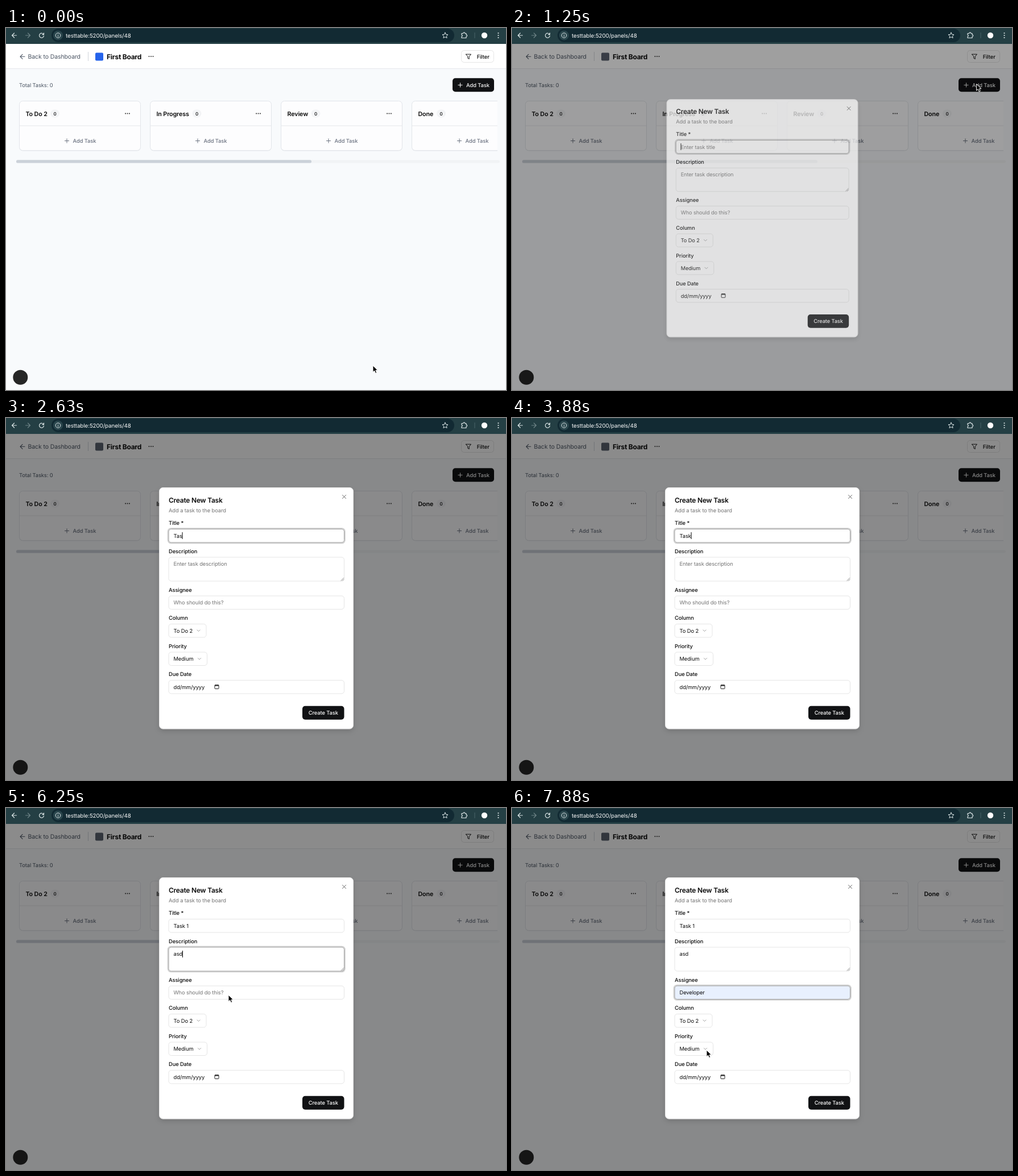
Animation of 879 by 637 pixels, one loop 8000 ms. Source, as an HTML page:

```html
<!DOCTYPE html>
<html lang="en">
<head>
<meta charset="utf-8">
<title>Task board</title>
<style>
  html, body { margin: 0; width: 100%; height: 100%; overflow: hidden; background: #f8fafc; }
  svg { display: block; width: 100%; height: 100%; }
  text {
    font: 400 9.35px Inter, sans-serif; fill: #0a0a0a; white-space: pre;
    letter-spacing: -.01em; text-rendering: geometricPrecision;
  }
  .medium { font-weight: 500; }
  .semi { font-weight: 600; }
  .bold { font-weight: 700; }
  .muted { fill: #6b7280; }
  .slate { fill: #4b5563; }
  .hint { fill: #737373; }
  .light { fill: #fafafa; }
  .mid { text-anchor: middle; }
  .heading { letter-spacing: -.02em; }
  .icon { fill: none; stroke-linecap: round; stroke-linejoin: round; }
  .field { fill: #fff; stroke: #e5e5e5; }
  .focused { stroke: #a1a1a1; }
</style>
</head>
<body>
<svg id="stage" viewBox="0 0 879 637" preserveAspectRatio="none"></svg>
<script>
const LOOP = 8000, STEP = 125;
const stage = document.getElementById('stage');

const text = (x, y, s, cls = '', size = 9.35, extra = '') =>
  `<text x="${x}" y="${y}" class="${cls}" style="font-size:${size}px" ${extra}>${s}</text>`;
const rect = (x, y, w, h, r, fill, extra = '') =>
  `<rect x="${x}" y="${y}" width="${w}" height="${h}" rx="${r}" fill="${fill}" ${extra}/>`;
const icon = (x, y, d, color, width = 1) =>
  `<path class="icon" transform="translate(${x} ${y})" d="${d}" stroke="${color}" stroke-width="${width}"/>`;
const dots = (x, y, dx, dy, color, r) => [-1, 0, 1].map(i =>
  `<circle cx="${x + i * dx}" cy="${y + i * dy}" r="${r}" fill="${color}"/>`).join('');

const PLUS = 'M-3.6 0H3.6M0-3.6V3.6';
const LEFT = 'M4 0H-4M0-4L-4 0L0 4';
const RIGHT = 'M-4 0H4M0-4L4 0L0 4';
const DOWN = 'M-2.6-1.3L0 1.3L2.6-1.3';
const CROSS = 'M-3-3L3 3M3-3L-3 3';
const FUNNEL = 'M-4.5-4H4.5L1.2 0V4.3L-1.2 3V0Z';
const RELOAD = 'M3.6-1.6A4 4 0 1 0 4 .8M4-4.2V-1.4H1.2';
const STAR = 'M0-5L1.5-1.7L5-1.3L2.4 1.1L3.1 4.6L0 2.8L-3.1 4.6L-2.4 1.1L-5-1.3L-1.5-1.7Z';
const PUZZLE = 'M-4.5-3H-1.8A1.6 1.6 0 0 1 1.4-3H3.5V-.6A1.6 1.6 0 0 1 3.5 2.6V5H-4.5V2.5A1.6 1.6 0 0 0-4.5-.6Z';
const BEAM = 'M-3-6.5Q0-6.5 0-4.5Q0-6.5 3-6.5M0-4.5V4.5M-3 6.5Q0 6.5 0 4.5Q0 6.5 3 6.5M-1.5 1.5H1.5';

function toolbar() {
  const ink = '#dbe5e6';
  return rect(0, 0, 879, 28, 0, '#243f44')
    + rect(80, 1, 708, 24, 12, '#122a33')
    + icon(14.5, 13, LEFT, ink, 1.2)
    + icon(38.5, 13, RIGHT, '#6d8386', 1.2)
    + icon(62.5, 13, RELOAD, ink, 1.2)
    + '<circle cx="91.5" cy="13" r="8.5" fill="#2a464d"/>'
    + `<circle cx="91.5" cy="13" r="4.3" fill="none" stroke="${ink}"/>`
    + icon(91.5, 13, 'M0-2V-1.9M0 0V2', ink)
    + text(105, 16.5, 'testtable:5200/panels/48', 'light', 9.8)
    + icon(772, 13, STAR, ink)
    + icon(805.5, 12.5, PUZZLE, ink, 1.2)
    + rect(823.5, 8, 1, 10, 0, '#4b666a')
    + '<circle cx="841" cy="13" r="5.2" fill="#fff"/>'
    + dots(865.5, 13, 0, 4, ink, 1.1);
}

function column([name, badgeX], i) {
  const x = 23 + 230 * i;
  return rect(x + .5, 129.5, 213, 87, 6, '#e9ecef')
    + rect(x + .5, 128.5, 213, 87, 6, '#fdfdfe', 'stroke="#e2e5ea"')
    + rect(x + 1, 171.5, 212, 1, 0, '#e5e7eb')
    + text(x + 11.5, 154.5, name, 'semi', 10.7)
    + rect(badgeX - 8, 143.5, 16, 14, 7, '#f3f4f6')
    + text(badgeX, 153.5, '0', 'mid medium', 8)
    + dots(x + 190.5, 150.5, 3.4, 0, '#222', .95)
    + icon(x + 84, 198.5, PLUS, '#6b7280')
    + text(x + 94.5, 201.8, 'Add Task', 'medium muted');
}

function board() {
  const columns = [['To Do 2', 86], ['In Progress', 335.5], ['Review', 544.5], ['Done', 765]];
  return rect(0, 28, 879, 609, 0, '#f8fafc')
    + rect(0, 28, 879, 43, 0, '#fff') + rect(0, 71, 879, 1, 0, '#e5e7eb')
    + icon(29, 50.3, LEFT, '#4b5563', 1.1)
    + text(38.5, 54.2, 'Back to Dashboard', 'slate', 10.5)
    + rect(144, 42, 1, 16, 0, '#d1d5db')
    + rect(157, 43.5, 14, 14, 2, '#2563eb', 'id="mark"')
    + text(177, 54.7, 'First Board', 'bold heading', 12)
    + dots(255, 50, 3.5, 0, '#222', .95)
    + rect(800.5, 39.5, 57, 21, 5, '#fff', 'stroke="#e5e5e5"')
    + icon(813, 50.2, FUNNEL, '#171717')
    + text(827.7, 53.7, 'Filter', 'medium')
    + text(23, 104, 'Total Tasks: 0', 'slate')
    + rect(785, 88.3, 73, 24, 5, '#111214')
    + icon(798.5, 100.4, PLUS, '#fafafa')
    + text(809, 103.8, 'Add Task', 'medium light')
    + `<g clip-path="url(#lanes)">${columns.map(column).join('')}</g>`
    + rect(18, 232.5, 850, 5, 2.5, '#f1f3f5') + rect(18, 232.3, 519, 5.2, 2.6, '#cbd1d9')
    + '<circle cx="25.3" cy="614.8" r="13" fill="#262626"/>';
}

// A labelled box; live ones get a ring and a text that changes.
const box = (label, labelY, y, w, h, value, cls, id = '') =>
  text(286, labelY, label, 'medium')
  + (id && rect(284.7, y - .8, w + 2.6, h + 2.6, 5.5, 'none', `id="${id}-ring" stroke="#d0d0d0" stroke-width="2"`))
  + `<rect id="${id || label}-box" class="field" x="286" y="${y + .5}" width="${w}" height="${h}" rx="4.5"/>`
  + text(294.5, y + 15.8, value, cls, 9.35, id && `id="${id}-text"`);

function dialog() {
  return rect(269.5, 122.5, 341, 424.5, 6.5, '#fff', 'stroke="#e5e5e5" filter="url(#shadow)"')
    + text(286, 148.7, 'Create New Task', 'semi heading', 12)
    + text(286, 165.8, 'Add a task to the board', 'hint')
    + icon(594.5, 138.6, CROSS, '#5f5f5f')
    + box('Title *', 188, 195, 308.5, 23.5, '', '', 'title')
    + box('Description', 237.6, 244.5, 308.5, 42, '', '', 'about')
    + icon(591.5, 284, 'M-2.5 2.2L2.2-2.5M0 2.2L2.2 0', '#777', .8)
    + box('Assignee', 305.8, 312.5, 308.5, 23.5, '', '', 'owner')
    + box('Column', 355.3, 362, 66, 23.5, 'To Do 2', '')
    + icon(338.5, 374.2, DOWN, '#a3a3a3')
    + box('Priority', 404.8, 411.5, 67.5, 23.5, 'Medium', '')
    + icon(340, 423.8, DOWN, '#a3a3a3')
    + box('Due Date', 454.4, 461, 308.5, 23.5, 'dd/mm/yyyy', '')
    + rect(367, 470, 7, 6.5, .8, 'none', 'stroke="#222"') + rect(367, 469.5, 7, 2, 0, '#222')
    + rect(521, 506.7, 73.5, 24, 5, '#111214')
    + text(557.8, 522.1, 'Create Task', 'mid medium light')
    + rect(0, 0, 1, 12, 0, '#000', 'id="caret"');
}

stage.innerHTML = `<defs>
    <clipPath id="lanes"><rect x="18" y="120" width="846" height="105"/></clipPath>
    <filter id="shadow" x="-10%" y="-10%" width="120%" height="120%">
      <feDropShadow dx="0" dy="4" stdDeviation="4" flood-opacity=".14"/></filter>
  </defs>
  ${board()}
  ${rect(0, 28, 879, 609, 0, '#000', 'id="shade"')}
  ${toolbar()}
  <g id="dialog">${dialog()}</g>
  <path id="arrow" d="M0 0V11.6L2.7 9.1L4.6 13.4L6.7 12.5L4.9 8.3H8.5Z" stroke="#fff" stroke-linejoin="round"/>
  <g id="beam">${icon(0, 0, BEAM, '#fff', 2.6)}${icon(0, 0, BEAM, '#111', 1.2)}</g>`;

const $ = id => document.getElementById(id);

// All tables are keyed by step, one step being 125 ms.
const opening = [[0, 0], [10, .7], [11, 1]];
const shade = [[0, 0], [10, .375], [11, .455]];
const focus = [[0, 'title'], [42, 'about'], [53, 'owner']];
const caretOn = [[0, 1], [27, 0], [31, 1], [63, 0]];
const fields = {
  title: { hint: 'Enter task title', caretY: 201, typed: [[0, ''], [19, 'T'], [21, 'Tas'], [23, 'Tas '],
    [25, 'Tas k'], [29, 'Tas '], [31, 'Task'], [35, 'Task '], [36, 'Task 1']] },
  about: { hint: 'Enter task description', caretY: 251, typed: [[0, ''], [44, 'a'], [45, 'as'], [46, 'asd']] },
  owner: { hint: 'Who should do this?', caretY: 319, typed: [[0, ''], [58, 'Developer']] }
};
const pointer = [
  [0, 645, 594, 'arrow'], [8, 818, 100, 'arrow'], [10, 816.5, 98.5, 'arrow'], [11, 793, 94, 'arrow'],
  [15, 430, 206, 'beam'], [19, 430, 206, ''], [35, 425, 215, 'beam'], [38, 421.5, 275, 'beam'],
  [43, 421.5, 275, ''], [47, 391, 362, 'arrow'], [50, 391, 329, 'arrow'], [51, 372, 325, 'beam'],
  [55, 372, 325, 'beam'], [57, 360, 350, 'arrow'], [60, 352, 350, 'arrow'],
  [62, 341, 425, 'arrow'], [63, 342, 426, 'arrow']
];

const entry = (table, k) => table.findLast(row => row[0] <= k);
const at = (table, k) => entry(table, k)[1];

function movePointer(k) {
  const from = entry(pointer, k), to = pointer[pointer.indexOf(from) + 1] || from;
  const u = to === from ? 0 : (k - from[0]) / (to[0] - from[0]);
  const e = u * u * (3 - 2 * u);
  const [x, y] = [1, 2].map(i => from[i] + (to[i] - from[i]) * e);
  for (const kind of ['arrow', 'beam']) {
    $(kind).setAttribute('visibility', from[3] === kind ? 'visible' : 'hidden');
    $(kind).setAttribute('transform', `translate(${x} ${y})`);
  }
}

function draw(k) {
  const open = at(opening, k), active = at(focus, k), zoom = .95 + .05 * open;
  $('shade').setAttribute('opacity', at(shade, k));
  $('mark').setAttribute('fill', open ? '#5b6270' : '#2563eb');
  $('dialog').setAttribute('opacity', open);
  $('dialog').setAttribute('transform', `translate(440 334.5) scale(${zoom}) translate(-440 -334.5)`);

  for (const [id, field] of Object.entries(fields)) {
    const typed = at(field.typed, k), label = $(id + '-text');
    label.textContent = typed || field.hint;
    label.classList.toggle('hint', !typed);
    $(id + '-ring').setAttribute('visibility', id === active ? 'visible' : 'hidden');
    $(id + '-box').classList.toggle('focused', id === active);
    if (id === 'owner') $('owner-box').style.fill = typed ? '#e8f0fe' : '#fff';
    if (id === active) {
      $('caret').setAttribute('x', 294.3 + (typed ? label.getComputedTextLength() : 0));
      $('caret').setAttribute('y', field.caretY);
    }
  }
  $('caret').setAttribute('opacity', at(caretOn, k));
  movePointer(k);
}

let shown = -1;
function tick() {
  const k = Math.floor(performance.now() % LOOP / STEP);
  if (k !== shown) draw(shown = k);
  requestAnimationFrame(tick);
}
tick();
</script>
</body>
</html>
```
